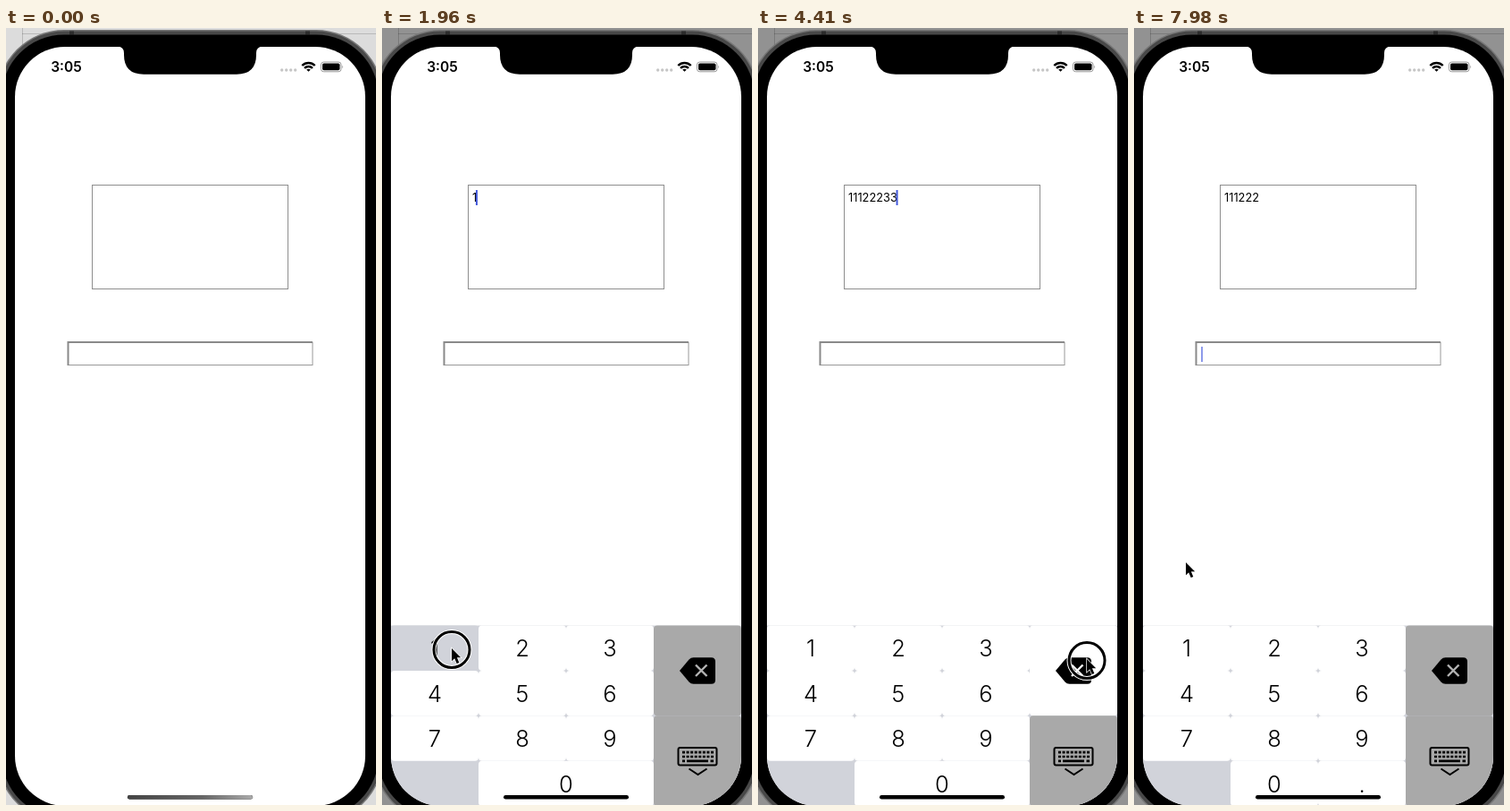
These frames come from a looping animation (414 px wide and 868 px high, 8000 ms). An HTML page:

```html
<!DOCTYPE html>
<html lang="en">
<head>
<meta charset="utf-8">
<title>Number pad input</title>
<style>
  html, body { margin: 0; width: 100%; height: 100%; overflow: hidden; background: #fff; }
  svg { display: block; width: 414px; height: 868px; font-family: Inter, Roboto, sans-serif; }
  #keys text { font-size: 25.5px; font-weight: 300; text-anchor: middle; }
</style>
</head>
<body>
<svg viewBox="0 0 414 868">
  <defs>
    <clipPath id="screen"><rect x="10" y="21" width="392" height="848" rx="56"/></clipPath>
    <linearGradient id="dim"><stop stop-color="#444"/><stop offset=".6" stop-color="#666"/><stop offset="1" stop-color="#aaa"/></linearGradient>
  </defs>

  <!-- desktop and phone body -->
  <rect id="desk" width="414" height="868"/>
  <path d="M18.5 0V20M18 6.5H414" stroke="#000" stroke-opacity=".16" fill="none"/>
  <rect x="-10" y="2" width="432" height="886" rx="75" fill="#777"/>
  <rect x="-8.5" y="3.5" width="429" height="883" rx="73.5" fill="#484848"/>
  <path d="M71 3.5h5v4h-5zM335 3.5h5v4h-5z" fill="#2c2c2c"/>
  <rect x="-5" y="7.5" width="422" height="875" rx="70" fill="#000"/>

  <g clip-path="url(#screen)">
    <rect x="10" y="21" width="392" height="848" fill="#fff"/>
    <rect x="96.5" y="175.5" width="219" height="116" fill="none" stroke="#8e8e8e"/>
    <rect x="69.5" y="351.5" width="273.5" height="25" fill="none" stroke="#999"/>
    <path d="M69.5 377V351H343" fill="none" stroke="#8a8a8a" stroke-width="2"/>
    <text id="typed" x="101" y="194" font-size="12.8"></text>
    <rect id="caret" width="2" height="17" fill="#4359dc"/>
    <g id="pad">
      <rect x="10" y="667.5" width="392" height="202" fill="#d1d3da"/>
      <g id="keys"></g>
      <path d="M333 718L343.5 705.5Q345.5 703.3 348.500 703.3H368.500Q373 703.3 373 707.800V728.200Q373 732.700 368.500 732.700H348.500Q345.500 732.700 343.500 730.500Z"/>
      <path id="cross" d="M351 711.500l12.500 12.500M363.500 711.500l-12.500 12.500" stroke-width="2.400"/>
      <g fill="none" stroke="#000" stroke-width="2">
        <rect x="331.500" y="804" width="43" height="19.500" rx="2"/>
        <path d="M336 809.200H371M336 814H371" stroke-width="2.700" stroke-dasharray="3 1.570"/>
        <path d="M336 818.800h3M341 818.800H365M367.500 818.800h3.500" stroke-width="2.700"/>
        <path d="M343.500 827.500L353.500 834L363.500 827.500"/>
      </g>
    </g>
    <rect x="136" y="857" width="140" height="4.600" rx="2.300"/>
    <rect id="dimBar" x="136" y="857" width="140" height="4.600" rx="2.300" fill="url(#dim)"/>
  </g>

  <!-- notch and status bar -->
  <path d="M125 20.500Q132 21 132 28V30Q132 51.700 154 51.700H258Q280 51.700 280 30V28Q280 21 287 20.500Z"/>
  <text x="67.500" y="49" font-size="15.500" font-weight="600" text-anchor="middle">3:05</text>
  <path d="M308.700 47h17" stroke="#c6c6c6" stroke-width="3.400" stroke-linecap="round" stroke-dasharray="0 5"/>
  <g fill="none" stroke="#000" stroke-width="2.400">
    <path d="M331.300 42A10 10 0 0 1 345.700 42M334 44.900A6.200 6.200 0 0 1 343 44.900"/>
    <path d="M338.500 48.700L336.200 46.500Q338.500 44.800 340.800 46.500Z" fill="#000" stroke="none"/>
  </g>
  <rect x="352.500" y="38" width="22.500" height="10.800" rx="3" fill="none" stroke="#999"/>
  <rect x="354" y="39.500" width="19.500" height="7.800" rx="1.700"/>
  <path d="M376.300 41.500q1.800 1.900 0 3.800z" fill="#999"/>

  <!-- mouse pointer -->
  <g id="mouse">
    <g id="ring" fill="none">
      <circle cy="1.500" r="20" stroke="#fff" stroke-width="5"/>
      <circle cy="1.500" r="20" stroke="#000" stroke-width="3"/>
    </g>
    <path d="M0 0V14.300L3.200 11.300L5.700 17L8.300 15.900L5.900 10.300H10.200Z" stroke="#fff" stroke-width="1.400" paint-order="stroke"/>
  </g>
</svg>

<script>
const $ = id => document.getElementById(id);
const LOOP = 8000, FOCUS = 840, SWAP = 7350;

// Pad keys: name, column, row, columns wide, rows high
const layout = [
  ...[1, 2, 3, 4, 5, 6, 7, 8, 9].map((n, i) => [n, i % 3, Math.floor(i / 3), 1, 1]),
  ['0', 1, 3, 2, 1], ['.', 2, 3, 1, 1], ['del', 3, 0, 1, 2], ['hide', 3, 2, 1, 2]
];
$('keys').innerHTML = layout.map(([name, col, row, w, h]) => {
  const x = 10 + col * 98, y = 667.5 + row * 50.4;
  const label = name.length > 1 ? '' : `<text x="${x + w * 49}" y="${y + 34.8}">${name}</text>`;
  return `<g id="k${name}"><rect x="${x}" y="${y}" width="${w * 98}" height="${h * 50.4}" rx="4" fill="${label ? '#fff' : '#a9a9a9'}"/>${label}</g>`;
}).join('');

// Taps: key, touch down, touch up
const taps = [
  ['box', 740, 820],
  ['1', 1770, 1850], ['1', 1910, 2010], ['1', 2130, 2220],
  ['2', 2500, 2590], ['2', 2690, 2780], ['2', 2870, 2960],
  ['3', 3270, 3400], ['3', 3540, 3650],
  ['del', 4290, 4430], ['del', 4510, 4600],
  ['0', 5180, 5270], ['0', 5370, 5460],
  ['del', 6050, 6140], ['del', 6260, 6350],
  ['field', 7200, 7290]
];

// Pointer stops: time, x, y
const stops = [
  [70, -14, 330], [700, 187, 241], [980, 187, 241], [1690, 78, 693], [2240, 78, 693],
  [2470, 160, 697], [2980, 160, 697], [3260, 298, 695], [3420, 299, 699], [3780, 299, 699],
  [3990, 368, 705], [4800, 368, 705], [5150, 209, 828], [5620, 209, 828],
  [6010, 368, 705], [6530, 368, 705], [7130, 198, 360], [7400, 198, 360], [7860, 58, 597]
];

function pointerAt(t) {
  const i = stops.findIndex(s => s[0] > t);
  if (i === 0) return stops[0].slice(1);
  if (i < 0) return stops.at(-1).slice(1);
  const [t0, x0, y0] = stops[i - 1], [t1, x1, y1] = stops[i];
  const u = (t - t0) / (t1 - t0), e = u * u * (3 - 2 * u);
  return [x0 + (x1 - x0) * e, y0 + (y1 - y0) * e];
}

const show = (id, on) => $(id).setAttribute('opacity', +on);

function draw(t) {
  const active = t >= 630, swapped = t >= SWAP;
  $('desk').setAttribute('fill', active ? '#929292' : '#dcdcdc');
  show('dimBar', !active);

  let text = '', down = '', ring = false, last = FOCUS;
  for (const [key, start, end] of taps) {
    if (t >= start) last = Math.max(last, start);
    if (t >= start && t < end) down = key;
    if (t >= start + 40 && t < end + 30) ring = true;
    if (t < end) continue;
    last = Math.max(last, end);
    if (key === 'del') text = text.slice(0, -1);
    else if (key.length === 1) text += key;
  }
  if (swapped) last = SWAP;

  $('typed').textContent = text;
  const width = text ? $('typed').getComputedTextLength() : 0;
  $('caret').setAttribute('x', swapped ? 75 : 99.7 + width);
  $('caret').setAttribute('y', swapped ? 356 : 181);
  // solid, fade out, dark, fade in
  const phase = (t - last) % 1000;
  const glow = phase < 800 ? 1 - (phase - 560) / 180 : (phase - 800) / 200;
  show('caret', t < FOCUS ? 0 : Math.min(1, Math.max(0, glow)));

  // keyboard rises on a critically damped spring
  const s = Math.max(0, t - 875) * 0.018;
  $('pad').setAttribute('transform', `translate(0 ${201 * (1 + s) * Math.exp(-s)})`);
  for (const [name] of layout) {
    const wide = name === 'del' || name === 'hide', hit = down === String(name);
    $('k' + name).firstChild.setAttribute('fill', wide ? (hit ? '#fff' : '#a9a9a9') : (hit ? '#d1d3da' : '#fff'));
  }
  $('cross').setAttribute('stroke', down === 'del' ? '#fff' : '#b4b4b4');
  const zero = $('k0');
  zero.firstChild.setAttribute('width', swapped ? 98 : 196);
  zero.lastChild.setAttribute('x', swapped ? 157 : 206);
  show('k.', swapped);

  $('mouse').setAttribute('transform', `translate(${pointerAt(t)})`);
  show('ring', ring);
}

const begin = performance.now();
function tick() {
  draw((performance.now() - begin) % LOOP);
  requestAnimationFrame(tick);
}
tick();
</script>
</body>
</html>
```
